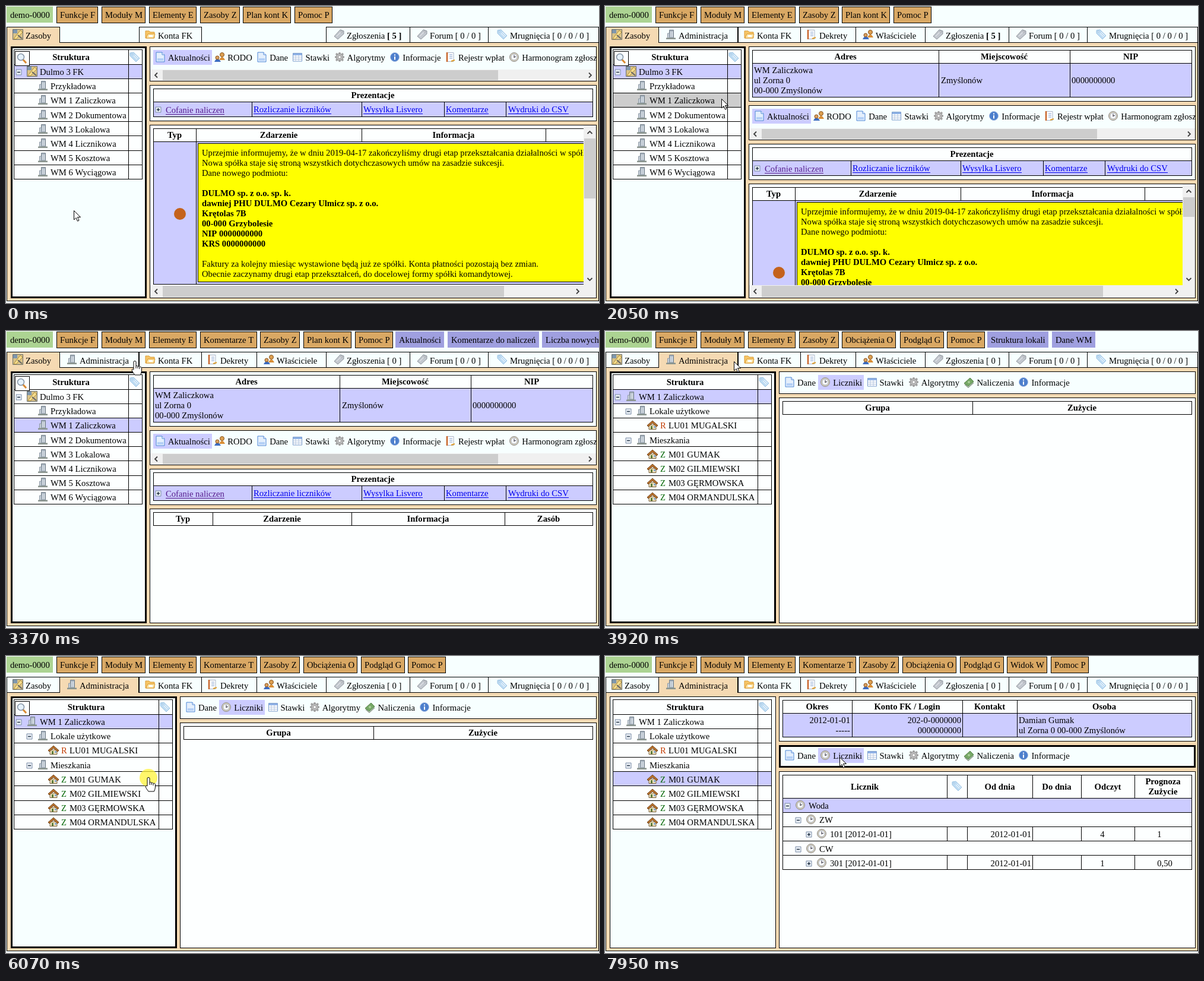
An HTML page with a canvas that plays this animation: 999 px wide and 500 px high, repeating every 8 s.

```html
<!DOCTYPE html>
<html lang="pl">
<head>
<meta charset="utf-8">
<title>Zasoby</title>
<style>
  html, body { margin: 0; width: 100%; height: 100%; overflow: hidden; background: #f7ffff; }
  canvas { display: block; }
</style>
</head>
<body>
<canvas id="stage" width="999" height="500"></canvas>
<script>
const ctx = document.getElementById('stage').getContext('2d');
const LOOP = 8000;
const PAGE = '#f7ffff', WHITE = '#fdffff', FRAME = '#f5dab3', PICK = '#ccccff', GREY = '#cdcdcd';
const FACE = '14.667px "Liberation Serif", "Times New Roman", serif';

// Drawing helpers; rectangles are given by their two corners
function rect(x0, y0, x1, y1, color) {
  ctx.fillStyle = color;
  ctx.fillRect(x0, y0, x1 - x0, y1 - y0);
}
function box(x0, y0, x1, y1, fill = PAGE, line = 1) {
  rect(x0, y0, x1, y1, '#000');
  rect(x0 + line, y0 + line, x1 - line, y1 - line, fill);
}
function setFont(bold) { ctx.font = (bold ? 'bold ' : '') + FACE; }
function widthOf(s) { setFont(false); return ctx.measureText(s).width; }
function text(s, x, y, { bold = false, align = 'left', color = '#000' } = {}) {
  setFont(bold);
  ctx.textAlign = align;
  ctx.fillStyle = color;
  ctx.fillText(s, x, Math.round(y + 5));
}
function link(s, x, y, color) {
  text(s, x, y, { color });
  rect(x, y + 7, Math.round(x + widthOf(s)), y + 8, color);
}
function row(xs, y0, y1, fill) {
  for (let i = 0; i + 1 < xs.length; i++) box(xs[i], y0, xs[i + 1] + 1, y1 + 1, fill);
}
function head(xs, y0, y1, labels) {
  row(xs, y0, y1, WHITE);
  labels.forEach((s, i) => text(s, (xs[i] + xs[i + 1]) / 2, (y0 + y1) / 2, { bold: true, align: 'center' }));
}
function clipped(x0, y0, x1, y1, paint) {
  ctx.save();
  ctx.beginPath();
  ctx.rect(x0, y0, x1 - x0, y1 - y0);
  ctx.clip();
  paint();
  ctx.restore();
}
function shapes(list, x, y) {
  ctx.save();
  ctx.translate(x, y);
  for (const [d, fill, stroke, line = 1] of list) {
    const path = new Path2D(d);
    if (fill) { ctx.fillStyle = fill; ctx.fill(path); }
    if (stroke) { ctx.strokeStyle = stroke; ctx.lineWidth = line; ctx.stroke(path); }
  }
  ctx.restore();
}
const ring = (x, y, r) => `M${x - r} ${y}a${r} ${r} 0 1 0 ${2 * r} 0a${r} ${r} 0 1 0 ${-2 * r} 0Z`;
const knob = mark => [['M-4.5-4.5H4.5V4.5H-4.5Z', '#e8eef5', '#7a8ca5'], [mark, null, '#234', 1.5]];

const ICONS = {
  doc: [['M-7-8H3L7-4V8H-7Z', '#e4effc', '#4d86d6'], ['M-5 2H5V6H-5Z', '#b4d0f6'], ['M3-8V-4H7', '#fff', '#4d86d6']],
  assets: [['M-8.5-8.5H8.5V8.5H-8.5Z', '#d9c288', '#6b6f6c'], ['M-8-8H-1V-2H-8Z', '#7f97ad'], ['M-7 7L4-7L8-4L-3 8Z', '#f6dd8c', '#a98a3b'], ['M0 1L7 7', null, '#666', 2]],
  building: [['M-2.5-7.5H4.5V6H-2.5Z', '#a7b3bf', '#75808a'], ['M-5.5-2H-2.5V6H-5.5Z', '#c9d2da', '#8d99a6'], ['M0-5V4M2.5-5V4', null, '#e9eef4', 1.2], ['M-8 5.5H8V8H-8Z', '#8b958f']],
  folder: [['M-8-6H-2L0-4H7V6H-8Z', '#f6c667', '#dc9a35'], ['M-7 6L-4-1H8L6 6Z', '#fde6a8', '#dc9a35'], ['M-2 1H4V4H-2Z', '#fff']],
  users: [['M-1 5Q4-5 9 5Z', '#d98e35'], [ring(4, -4, 3.5), '#dca052', '#8a5620'], ['M-9 8Q-4-2 2 8Z', '#3c6cc0'], [ring(-4, 1, 3), '#d9a060', '#8a5620']],
  grid: [['M-7.5-6.5H7.5V7H-7.5Z', '#fff', '#7d9dcc'], ['M-7-6H7V-3H-7Z', '#8fb2e6'], ['M-7 0H7M-7 3.5H7M-3-3V7M2-3V7', null, '#b4c6e0']],
  gear: [['M0-8V8M-8 0H8M-6-6L6 6M-6 6L6-6', null, '#a3a3a3', 3.2], [ring(0, 0, 5.8), '#bcbcbc', '#909090'], [ring(0, 0, 2.5), '#fff', '#909090']],
  info: [[ring(0, 0, 7.5), '#4d7fcc', '#aac0e4'], ['M0-4.5V-2.5M0-1V4.5', null, '#fff', 2]],
  journal: [['M-5.5-7.5H5V7.5H-5.5Z', '#fff', '#a8b4c8'], ['M-6-8V8', null, '#c8642a', 2.5], ['M-2-4H3M-2-1H3M-2 2H3', null, '#7d9dcc'], ['M1 7L7 5', null, '#e0a030', 2]],
  clock: [[ring(0, 0, 7.5), '#d5ccb8', '#8f8f8f'], [ring(0, 0, 5), '#fff', '#a7b4c4'], ['M0-3.5V0.5L3-1', null, '#445', 1.2]],
  money: [['M-8 2L2-7L8-1L-1 7Z', '#76a866', '#4e7f45'], ['M-7 4L-1 9L8 1', null, '#8a9a88', 1.5], [ring(0, 0, 2), '#a9cf9a']],
  house: [['M-6 0H6V7.5H-6Z', '#f3e3bd', '#75603c'], ['M-9 1L0-7L9 1L7 3L0-3L-7 3Z', '#b9722e', '#6f431a'], ['M-3 2H0V7H-3Z', '#5d7d3c'], ['M2 2H5V5H2Z', '#87a9cf']],
  greyTag: [['M-8 3L2-8L8-6V-1L-2 8Z', '#c3c8cf', '#8f959c'], [ring(4.5, -4.5, 1.3), '#fff', '#8f959c'], ['M-4 3L3-4', null, '#eef0f2']],
  blueTag: [['M-8-7L-2-8L8 2L2 8L-8-2Z', '#bfdcf3', '#9cc4e4'], [ring(-5, -5, 1.3), '#fff', '#9cc4e4'], ['M-2-2L4 4M0-4L6 2', null, '#fff']],
  plus: knob('M-2.5 0H2.5M0-2.5V2.5'),
  minus: knob('M-2.5 0H2.5'),
  lens: [['M1.5 2L7 8', null, '#d98a32', 3], [ring(-2, -2, 5.5), '#e6f2fc', '#8796a6', 1.5]],
  arrow: [['M.5.5V16L4 12.5L6.5 18.2L9 17L6.5 11.5H11.5Z', '#fff', '#000']],
  hand: [['M-2 1Q-2-.5 0-.5Q2-.5 2 1V8Q4 6.5 5 8.5Q7 7.5 8 9.5Q11.5 8.5 11.5 12V16Q11 20 9.5 23H0Q-4 18-5 15Q-5 12-2 14Z', '#fff', '#000'], ['M2 8V12M5 9V12M8 10V13', null, '#000']]
};
const icon = (name, x, y) => shapes(ICONS[name], x, y);

function bar(x0, y0, x1, y1, from, to) {
  const wide = x1 - x0 > y1 - y0;
  rect(x0, y0, x1, y1, '#f0f0f0');
  if (wide) rect(from, y0 + 1, to, y1 - 1, GREY); else rect(x0 + 1, from, x1 - 1, to, GREY);
  const cx = (x0 + x1) / 2, cy = (y0 + y1) / 2;
  const chevron = (d, x, y) => shapes([[d, null, '#404040', 1.8]], x, y);
  if (wide) {
    chevron('M2-4L-2 0L2 4', x0 + 10, cy);
    chevron('M-2-4L2 0L-2 4', x1 - 10, cy);
  } else {
    chevron('M-4 2L0-2L4 2', cx, y0 + 12);
    chevron('M-4-2L0 2L4-2', cx, y1 - 10);
  }
}

// Time, key buttons after the common ones, context buttons
const MENUS = [
  [0, 'Zasoby Z|Plan kont K|Pomoc P', ''],
  [2300, 'Komentarze T|Zasoby Z|Plan kont K|Pomoc P', 'Aktualności|Komentarze do naliczeń|Liczba nowych'],
  [3850, 'Zasoby Z|Obciążenia O|Podgląd G|Pomoc P', 'Struktura lokali|Dane WM'],
  [4150, 'Komentarze T|Zasoby Z|Obciążenia O|Podgląd G|Pomoc P', 'Struktura lokali|Dane WM|Liczba nowych'],
  [5080, 'Komentarze T|Zasoby Z|Obciążenia O|Podgląd G|Pomoc P', ''],
  [6240, 'Komentarze T|Zasoby Z|Obciążenia O|Podgląd G|Widok W|Pomoc P', ''],
  [6470, 'Komentarze T|Zasoby Z|Obciążenia O|Podgląd G|Widok W|Pomoc P', 'Liczniki'],
  [7950, 'Komentarze T|Zasoby Z|Obciążenia O|Podgląd G|Widok W|Pomoc P', '']
];
function menu(t) {
  const [, keys, extra] = MENUS.filter(m => t >= m[0]).pop();
  let x = 1;
  const button = (s, color, edged) => {
    const w = widthOf(s), left = Math.round(x), right = left + Math.round(w + 11.3);
    if (edged) box(left, 1, right, 29, color); else rect(left, 1, right, 28, color);
    text(s, left + 6, 15);
    x += w + 17;
  };
  button('demo-0000', '#acd392');
  ('Funkcje F|Moduły M|Elementy E|' + keys).split('|').forEach(s => button(s, '#d9a864', true));
  x -= 1;
  if (extra) extra.split('|').forEach(s => button(s, '#9f9fdf'));
}

function tabs(t) {
  const open = t >= 2050, active = t < 3850 ? 0 : 1, unread = t < 2300;
  const list = [
    [1, 90, 'assets', 'Zasoby', 33], [90, 223, 'building', 'Administracja', 124],
    [224, 329, 'folder', 'Konta FK', 256], [329, 422, 'journal', 'Dekrety', 361],
    [422, 539, 'users', 'Właściciele', 456], [539, 680, 'greyTag', 'Zgłoszenia ', 574],
    [680, 812, 'greyTag', 'Forum [ 0 / 0 ]', 714], [812, 998, 'blueTag', 'Mrugnięcia [ 0 / 0 / 0 ]', 849]
  ];
  list.forEach(([x0, x1, name, label, x], i) => {
    if (!open && (i === 1 || i === 3 || i === 4)) return;
    box(x0, 35, x1 + 1, 62, i === active ? FRAME : PAGE);
    if (i === active) rect(x0 + 1, 61, x1, 62, FRAME);
    icon(name, x - 13, 48);
    text(label, x, 50);
    if (i === 5) text(unread ? '[ 5 ]' : '[ 0 ]', x + widthOf(label), 50, { bold: unread });
  });
}

// Level, icon, label, has children, mark
const ASSETS = [[0, 'assets', 'Dulmo 3 FK', true],
  ...['Przykładowa', 'WM 1 Zaliczkowa', 'WM 2 Dokumentowa', 'WM 3 Lokalowa', 'WM 4 Licznikowa', 'WM 5 Kosztowa', 'WM 6 Wyciągowa']
    .map(s => [1, 'building', s])];
const UNITS = [[0, 'building', 'WM 1 Zaliczkowa', true], [1, 'building', 'Lokale użytkowe', true],
  [2, 'house', 'LU01 MUGALSKI', false, 'R'], [1, 'building', 'Mieszkania', true],
  ...['M01 GUMAK', 'M02 GILMIEWSKI', 'M03 GĘRMOWSKA', 'M04 ORMANDULSKA'].map(s => [2, 'house', s, false, 'Z'])];

function tree(t) {
  const admin = t >= 3850, focused = t < 7550;
  const right = admin ? 280 : 229, split = admin ? 257 : 206;
  const clicked = admin ? 4 : 2;
  const chosen = (admin ? t >= 6470 : t >= 2300) ? clicked : 0;
  const pressed = (admin ? t >= 6240 : t >= 2050) ? clicked : -1;
  box(8, 68, right + 8, 492, PAGE, focused ? 3 : 1);
  row([13, split, right], 73, 98, WHITE);
  text('Struktura', (13 + split) / 2, 86, { bold: true, align: 'center' });
  icon('blueTag', split + 11, 86);
  (admin ? UNITS : ASSETS).forEach(([level, name, label, parent, mark], i) => {
    const top = 98 + 24.17 * i, y = Math.round(top + 13), dx = 18 * level;
    const fill = i === chosen ? PICK : i === pressed ? GREY : WHITE;
    row([13, split, right], Math.floor(top), Math.floor(top + 24.17), fill);
    if (parent) icon('minus', 21.5 + dx, y + 0.5);
    icon(name, 44 + dx, y - 1);
    if (mark) text(mark, 57 + dx, y, { color: mark === 'R' ? '#c23a00' : '#006400' });
    text(label, (mark ? 71 : 57) + dx, y);
  });
  if (focused && (t < 3850 || t >= 5080)) {
    box(15, 76, 40, 101, WHITE);
    icon('lens', 27, 88);
  }
}

function toolbar(x, y, items, selected) {
  items.forEach(([name, label], i) => {
    const w = widthOf(label);
    if (i === selected) rect(Math.round(x - 25), y - 13, Math.round(x + w + 3), y + 12, PICK);
    icon(name, Math.round(x - 13), y - 1);
    text(label, x, y);
    x += w + 29.4;
  });
}
const ASSET_TOOLS = [['doc', 'Aktualności'], ['users', 'RODO'], ['doc', 'Dane'], ['grid', 'Stawki'], ['gear', 'Algorytmy'],
  ['info', 'Informacje'], ['journal', 'Rejestr wpłat'], ['clock', 'Harmonogram zgłoszeń']];
const UNIT_TOOLS = [['doc', 'Dane'], ['clock', 'Liczniki'], ['grid', 'Stawki'], ['gear', 'Algorytmy'], ['money', 'Naliczenia'], ['info', 'Informacje']];

const NEWS = `Uprzejmie informujemy, że w dniu 2019-04-17 zakończyliśmy drugi etap przekształcania działalności w spółkę
Nowa spółka staje się stroną wszystkich dotychczasowych umów na zasadzie sukcesji.
Dane nowego podmiotu:

DULMO sp. z o.o. sp. k.
dawniej PHU DULMO Cezary Ulmicz sp. z o.o.
Krętolas 7B
00-000 Grzybolesie
NIP 0000000000
KRS 0000000000

Faktury za kolejny miesiąc wystawione będą już ze spółki. Konta płatności pozostają bez zmian.
Obecnie zaczynamy drugi etap przekształceń, do docelowej formy spółki komandytowej.`.split('\n');

function news(top, thumbEnd) {
  clipped(243, top + 1, 973, 470, () => {
    head([248, 320, 599, 909, 1100], top + 6, top + 28, ['Typ', 'Zdarzenie', 'Informacja', '']);
    row([248, 320, 1100], top + 28, top + 268, PICK);
    box(323, top + 31, 1100, top + 265, '#ffff00');
    shapes([[ring(293, 0, 10), '#c4621c']], 0, top + 150);
    NEWS.forEach((s, i) => text(s, 330, top + 47 + 17 * i, { bold: i > 3 && i < 10 }));
  });
  bar(973, top + 1, 994, 470, top + 23, thumbEnd);
  bar(243, 470, 973, 491, 264, 839);
  rect(973, 470, 994, 491, '#f0f0f0');
}

function assetPanels(t) {
  const opened = t >= 2050, dy = opened ? 99 : 0;
  if (opened) {
    const xs = [248, 562, 783, 988];
    box(242, 68, 995, 161);
    head(xs, 74, 96, ['Adres', 'Miejscowość', 'NIP']);
    row(xs, 96, 153, PICK);
    ['WM Zaliczkowa', 'ul Zorna 0', '00-000 Zmyślonów'].forEach((s, i) => text(s, 251, 108 + 17 * i));
    text('Zmyślonów', 566, 125);
    text('0000000000', 786, 125);
  }
  box(242, 68 + dy, 995, 127 + dy);
  clipped(243, 69 + dy, 994, 126 + dy, () => toolbar(273, 87 + dy, ASSET_TOOLS, 0));
  bar(243, 107 + dy, 994, 126 + dy, 264, 829);

  box(242, 133 + dy, 995, 194 + dy);
  head([248, 988], 139 + dy, 161 + dy, ['Prezentacje']);
  row([248, 414, 599, 738, 842, 988], 161 + dy, 186 + dy, PICK);
  icon('plus', 256.5, 174.5 + dy);
  link('Cofanie naliczen', 269, 175 + dy, '#551a8b');
  [['Rozliczanie liczników', 417], ['Wysylka Lisvero', 602], ['Komentarze', 741], ['Wydruki do CSV', 846]]
    .forEach(([s, x]) => link(s, x, 174 + dy, '#0000ee'));

  box(242, 200 + dy, 995, 492, WHITE);
  if (t < 2300) news(200 + dy, opened ? 355 : 324);
  else head([248, 348, 582, 840, 988], 305, 327, ['Typ', 'Zdarzenie', 'Informacja', 'Zasób']);
}

function meters() {
  const xs = [299, 576, 610, 720, 802, 892, 988];
  head(xs, 200, 239, ['Licznik', '', 'Od dnia', 'Do dnia', 'Odczyt', '']);
  icon('blueTag', 593, 219);
  ['Prognoza', 'Zużycie'].forEach((s, i) => text(s, 940, 211 + 17 * i, { bold: true, align: 'center' }));
  [[0, 'Woda'], [1, 'ZW'], [2, '101 [2012-01-01]', '4', '1', 934], [1, 'CW'], [2, '301 [2012-01-01]', '1', '0,50', 943]]
    .forEach(([level, label, reading, forecast, x], i) => {
      const top = 239 + 24.17 * i, y = Math.round(top + 13), dx = 18 * level;
      row(reading ? xs : [299, 988], Math.floor(top), Math.floor(top + 24.17), i ? WHITE : PICK);
      icon(reading ? 'plus' : 'minus', 307.5 + dx, y + 0.5);
      icon('clock', 329 + dx, y - 1);
      text(label, 343 + dx, y);
      if (!reading) return;
      text('2012-01-01', 718, y, { align: 'right' });
      text(reading, 838, y, { align: 'center' });
      text(forecast, x, y, { align: 'center' });
    });
}

function unitPanels(t) {
  const opened = t >= 6240, dy = opened ? 82 : 0, focused = t >= 7550;
  if (opened) {
    const xs = [299, 416, 602, 694, 988];
    box(293, 68, 995, 144);
    head(xs, 74, 96, ['Okres', 'Konto FK / Login', 'Kontakt', 'Osoba']);
    row(xs, 96, 136, PICK);
    [['2012-01-01', '202-0-0000000', 'Damian Gumak'], ['-----', '0000000000', 'ul Zorna 0 00-000 Zmyślonów']]
      .forEach(([period, account, person], i) => {
        const y = 108 + 17 * i;
        text(period, 413, y, { align: 'right' });
        text(account, 600, y, { align: 'right' });
        text(person, 697, y);
      });
  }
  box(293, 68 + dy, 995, 106 + dy, PAGE, focused ? 3 : 1);
  toolbar(324, (focused ? 86 : 87) + dy, UNIT_TOOLS, 1);
  box(293, 112 + dy, 995, 492, WHITE);
  if (t >= 6470) meters();
  else head([299, 619, 988], 118 + dy, 140 + dy, ['Grupa', 'Zużycie']);
}

// Start, end, steps, destination
const MOVES = [[500, 1280, 11, 195, 168], [1350, 1580, 4, 196, 156], [2760, 3370, 9, 217, 51],
  [4930, 5690, 11, 236, 192], [5760, 5840, 2, 240, 205], [6930, 7230, 5, 395, 170]];
const HAND = [[780, 2050], [2760, 3850], [5760, 6240], [7230, 7550]];
const CLICKS = [[1900, 2050], [3770, 3920], [6070, 6240], [7480, 7720]];
const within = (t, spans) => spans.some(([a, b]) => t >= a && t < b);

function pointer(t) {
  let x = 114, y = 344;
  for (const [a, b, steps, toX, toY] of MOVES) {
    if (t < a) break;
    const k = Math.min(steps, Math.floor((t - a) / (b - a) * (steps - 1)) + 1) / steps;
    const ease = k * k * (3 - 2 * k);
    x += (toX - x) * ease;
    y += (toY - y) * ease;
  }
  if (within(t, CLICKS)) shapes([[ring(0, 0, 15), 'rgba(255,242,50,.72)']], x, y);
  icon(within(t, HAND) ? 'hand' : 'arrow', Math.round(x), Math.round(y));
}

function draw(now) {
  const t = now % LOOP;
  rect(0, 0, 999, 500, PAGE);
  menu(t);
  box(1, 61, 999, 497, FRAME);
  tabs(t);
  tree(t);
  if (t < 3850) assetPanels(t); else unitPanels(t);
  pointer(t);
  requestAnimationFrame(draw);
}
requestAnimationFrame(draw);
</script>
</body>
</html>
```
